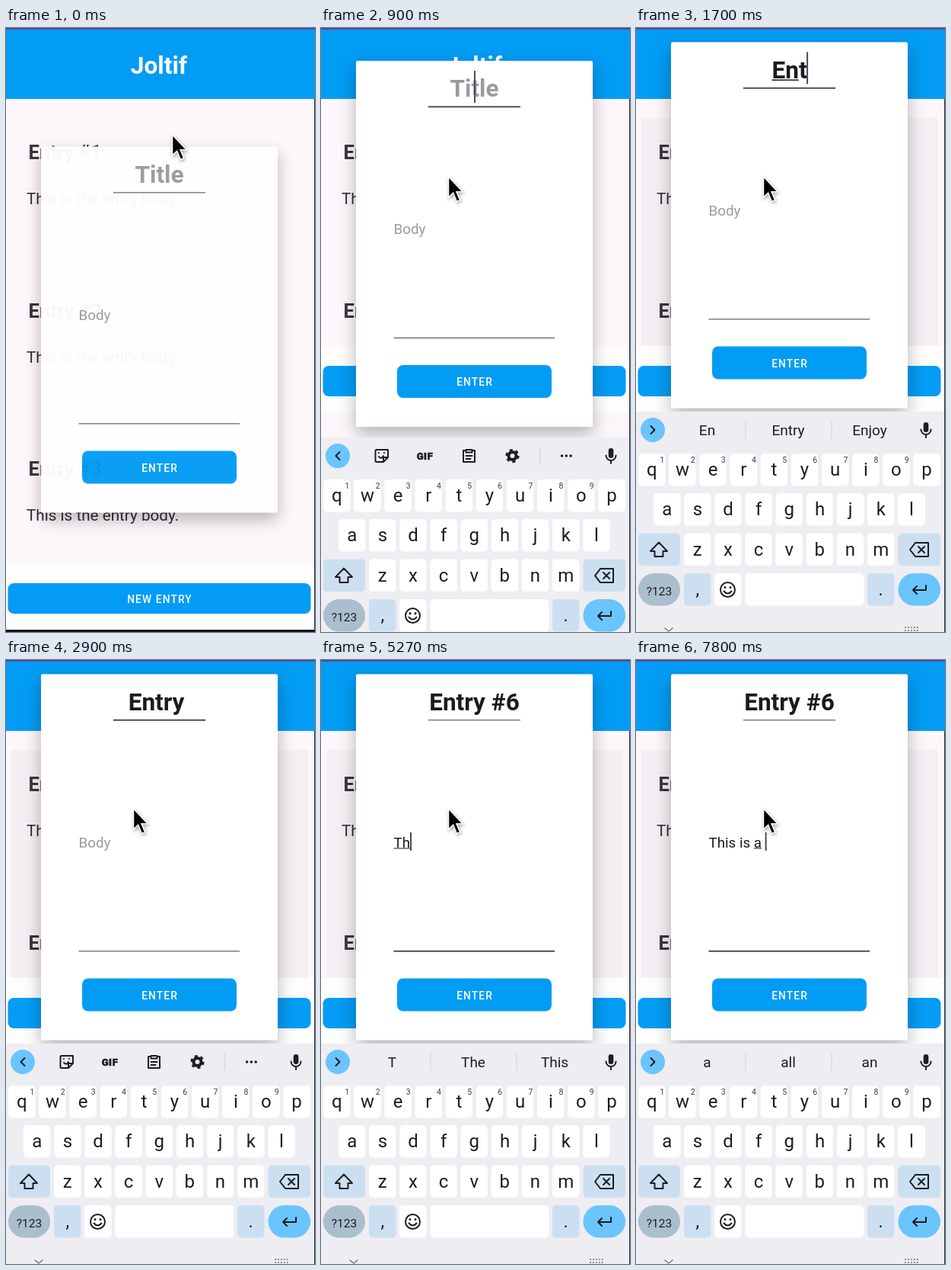
Recreate the animation shown at these times as an HTML page. Size 406x792 px, loop 8 s.

```html
<!DOCTYPE html>
<html lang="en">
<head>
<meta charset="utf-8">
<title>Journal entry form</title>
<style>
  html, body { margin: 0; width: 100%; height: 100%; overflow: hidden; background: #fdf6fa; }
  svg { display: block; width: 406px; height: 792px; font-family: Roboto, "Noto Sans", sans-serif; }
  text { white-space: pre; }
  .mid { text-anchor: middle; }
  .btn { font-size: 13.8px; font-weight: 500; letter-spacing: 1.1px; fill: #fff; text-anchor: middle; }
  .head { font-size: 31.6px; font-weight: 700; text-anchor: middle; }
  .line { fill: none; stroke: #1d1c21; stroke-width: 2; stroke-linecap: round; stroke-linejoin: round; }
  #dialog { filter: drop-shadow(0 9px 11px rgba(0, 0, 0, .28)); }
  #mouse { filter: drop-shadow(1px 2px 2px rgba(0, 0, 0, .35)); }
</style>
</head>
<body>
<svg viewBox="0 0 406 792">
  <rect width="406" height="792" fill="#fdf6fb"/>
  <rect id="cards" x="7" y="118" width="390" height="600" fill="#f5eff4"/>
  <g id="list"></g>
  <rect width="406" height="93" fill="#039cf4"/>
  <rect width="406" height="2" fill="#56489c"/>
  <text class="head" x="201" y="60" fill="#fff">Joltif</text>
  <g id="footer">
    <rect y="702" width="406" height="87" fill="#fdfdfe"/>
    <rect id="below" y="789" width="406" height="290" fill="#fbf6fa"/>
    <rect x="2.5" y="728" width="398" height="40" rx="8" fill="#049cf4"/>
    <text class="btn" x="202" y="753.5">NEW ENTRY</text>
  </g>
  <rect y="789" width="406" height="3" fill="#121214"/>
  <rect x="405" y="93" width="1" height="699" fill="#2a292c"/>

  <g id="dialog">
    <rect x="46" width="311" height="480" rx="2" fill="#fff"/>
    <text id="title" class="head" x="201.5" y="47"></text>
    <rect id="titleMark" y="49" height="1.5" fill="#1d1c21"/>
    <rect id="titleLine" x="141" width="121" fill="#504c5e"/>
    <text id="body" x="95.5" y="227" font-size="18.75"></text>
    <rect id="bodyMark" y="228" height="1" fill="#1d1c21"/>
    <rect id="bodyLine" x="95.5" width="211.5" fill="#504c5e"/>
    <rect id="caret" width="2" fill="#4c485c"/>
    <rect x="100" y="399" width="203" height="43" rx="8" fill="#039cf4"/>
    <text class="btn" x="202" y="426">ENTER</text>
  </g>

  <g id="keyboard">
    <rect y="503" width="405" height="300" fill="#eeedf2"/>
    <g id="keys"></g>
    <g class="line">
      <path d="M30 674.5l11 11.5h-5.5v7h-11v-7h-5.500z"/>
      <path d="M367 675h17v18h-17l-7-9zm4 5l8 8m0-8l-8 8"/>
      <path d="M381 731v6h-17m5-5l-5 5l5 5"/>
      <circle cx="120.500" cy="736.500" r="9.500"/>
      <path d="M115.500 738.500q5 6 10 0"/>
      <path d="M38 787l5 4l5-4" stroke="#77757c" stroke-width="1.5"/>
      <path d="M354 786h16m-16 4h16" stroke="#77757c" stroke-dasharray=".1 3.8"/>
      <path d="M117 733.500v.1m7-.1v.1" stroke-width="3"/>
    </g>
    <circle cx="22" cy="527" r="16" fill="#6ac5fd"/>
    <path id="chevron" class="line" d="M24.500 522l-5 5l5 5"/>
    <g id="tools" class="line" stroke-width="1.8">
      <path d="M73 519h15v10l-6 6h-9a1.500 1.500 0 0 1-1.500-1.500v-13a1.500 1.500 0 0 1 1.500-1.500zm15 10h-6v6m-6-7q3.500 4 6-1m-6-4v.1m7-.1v.1"/>
      <text class="mid" x="136.500" y="531.500" font-size="13" font-weight="900" letter-spacing=".6" fill="#1d1c21" stroke="#1d1c21" stroke-width=".5">GIF</text>
      <path d="M190 520h-3v15h15v-15h-3m-8.500-1h8v3.500h-8zm0 8h8m-8 4h6"/>
      <circle cx="251.500" cy="527" r="5" stroke-width="4"/>
      <circle cx="251.500" cy="527" r="7.800" stroke-width="2.600" stroke-linecap="butt" stroke-dasharray="4.084"/>
      <path d="M287.500 516v22" stroke="#d2d1d7" stroke-width="1"/>
      <path d="M316.500 527h12" stroke-width="3.500" stroke-dasharray=".1 5.700"/>
    </g>
    <g id="hints" class="mid" font-size="19" fill="#1d1c21">
      <path d="M144 515v24m113-24v24" stroke="#d2d1d7"/>
      <text x="93.500" y="534"></text>
      <text x="200" y="534"></text>
      <text x="307" y="534"></text>
    </g>
    <rect x="377.700" y="517" width="6.600" height="13" rx="3.300" fill="#1d1c21"/>
    <path class="line" d="M374.500 526.500a6.500 6.500 0 0 0 13 0m-6.500 6.500v4"/>
  </g>

  <path id="mouse" d="M0 0V27L6.200 21.200L10.800 32.500L15.200 30.600L10.500 19.700H18.800Z" fill="#000" stroke="#fff" stroke-width="1.500"/>
</svg>
<script>
const LOOP = 8000;
const $ = id => document.getElementById(id);

function add(parent, tag, attrs, label) {
  const el = document.createElementNS('http://www.w3.org/2000/svg', tag);
  set(el, attrs);
  if (label) el.textContent = label;
  parent.append(el);
  return el;
}
function set(el, attrs) {
  for (const name in attrs) el.setAttribute(name, attrs[name]);
}

for (let i = 0; i < 3; i++) {
  const y = 172 + i * 207.5;
  add($('list'), 'text', { x: 29.5, y, 'font-size': 25.6, 'font-weight': 700, fill: '#38353c' }, `Entry #${i + 1}`);
  add($('list'), 'text', { x: 27, y: y + 59, 'font-size': 20.7, fill: '#2f2d33' }, 'This is the entry body.');
}

// Keyboard
const PITCH = 40.15;
function key(x, y, w, label = '', fill = '#fff', rx = 5, size = 24) {
  add($('keys'), 'rect', { x, y, width: w, height: 42.5, rx, fill });
  add($('keys'), 'text', { x: x + w / 2, y: y + 29, 'font-size': size, class: 'mid', fill: '#1d1c21' }, label);
}
[['qwertyuiop', 3, 558], ['asdfghjkl', 23, 610], ['zxcvbnm', 63, 662.5]].forEach(([row, left, y], r) => {
  [...row].forEach((letter, i) => {
    const x = left + i * PITCH;
    key(x, y, 35.5, letter);
    if (!r) add($('keys'), 'text', { x: x + 31.5, y: y + 12, 'font-size': 10.5, class: 'mid', fill: '#3b393f' }, (i + 1) % 10);
  });
});
const SOFT = '#cbdff1';
key(3, 662.5, 55, '', SOFT);
key(344.5, 662.5, 55.5, '', SOFT);
key(3, 715, 55, '?123', '#aabecd', 21, 15.5);
key(63, 715, 35.5, ',', SOFT);
key(103, 715, 35.5);
key(143.5, 715, 156);
key(304, 715, 35.5, '.', SOFT);
key(344.5, 715, 55.5, '', '#6ac5fd', 21);

// Typing: time, text, underlined from, underlined to
const TITLE = [
  [0, '', 0, 0], [1270, 'E', 0, 1], [1530, 'En', 0, 2], [1700, 'Ent', 0, 2], [1870, 'Entr', 0, 4],
  [2030, 'Entry', 0, 5], [2200, 'Entry ', 0, 0], [3170, 'Entry #', 0, 0], [3730, 'Entry #6', 0, 0]
];
const BODY = [
  [0, '', 0, 0], [4970, 'T', 0, 1], [5270, 'Th', 0, 2], [5870, 'Ths', 0, 3], [6070, 'Thsi', 0, 4],
  [6300, 'This ', 0, 0], [7000, 'This i', 5, 6], [7170, 'This is', 5, 7], [7400, 'This is ', 0, 0],
  [7570, 'This is a', 8, 9], [7800, 'This is a ', 8, 9]
];
const HINTS = [
  [0, 'E I The'], [1570, 'En Entry Enjoy'], [1900, 'Entr Entry Enter'], [2060, 'Entry Entry’s Entryway'],
  [4970, 'T The This'], [5300, 'Th The That'], [5900, 'Ths This The'], [6130, 'Thsi This Thai'],
  [7000, 'i is in'], [7200, 'is is is a'.slice(0, 5) + ' isn’t'], [7430, 'the a not'], [7800, 'a all an']
];
const STRIP = [[0, 0], [1270, 1], [2200, 0], [4970, 1], [6300, 0], [7000, 1]];
const FOCUS_TITLE = 670, FOCUS_BODY = 4570;

const clamp = v => Math.max(0, Math.min(1, v));
const smooth = v => { v = clamp(v); return v * v * (3 - 2 * v); };
const at = (table, t) => table.findLast(step => step[0] <= t);

function track(points, t) {
  let i = points.findIndex(p => p[0] > t);
  if (i < 0) return points.at(-1)[1];
  if (!i) return points[0][1];
  const [a, from] = points[i - 1], [b, to] = points[i];
  return from + (to - from) * (t - a) / (b - a);
}

// Writes one field and returns the x of the caret.
function field(name, steps, hint, t, centred) {
  const [, value, from, to] = at(steps, t);
  const el = $(name);
  el.textContent = value || hint;
  el.setAttribute('fill', value ? '#1b1a1e' : '#9c9a9e');
  const width = n => n ? el.getSubStringLength(0, n) : 0;
  const full = value ? width(value.length) : 0;
  const left = centred ? 201.5 - full / 2 : 95.5;
  set($(name + 'Mark'), { x: left + width(from), width: to ? width(to) - width(from) : 0 });
  return left + full;
}

function underline(el, y, focused) {
  set(el, { y: focused ? y - .9 : y - .4, height: focused ? 2 : 1.1 });
}

function draw(t) {
  const raised = t >= 740;
  set($('footer'), { transform: `translate(0 ${raised ? -285 : 0})` });
  $('below').style.display = raised ? '' : 'none';
  $('cards').style.opacity = t >= 950 ? 1 : 0;

  const lift = track([[720, 0], [800, .182], [850, .53], [900, .818], [940, .94], [1000, 1]], t);
  set($('dialog'), { transform: `translate(0 ${155.5 - 137 * lift})`, opacity: .965 + .035 * clamp(t / 70) });

  const slide = track([[720, 0], [800, .2], [850, .58], [900, .88], [940, .965], [1000, 1]], t);
  set($('keyboard'), {
    transform: `translate(0 ${289 * (1 - slide)})`,
    opacity: track([[720, 0], [800, .22], [880, 1]], t)
  });

  const titleEnd = field('title', TITLE, 'Title', t, true);
  const bodyEnd = field('body', BODY, 'Body', t, false);
  const onBody = t >= FOCUS_BODY, onTitle = t >= FOCUS_TITLE && !onBody;
  underline($('titleLine'), 60.2, onTitle);
  underline($('bodyLine'), 363.2, onBody);
  const blink = t >= 2900 && t < 3170;
  set($('caret'), {
    x: onBody ? bodyEnd : titleEnd - .5,
    y: onBody ? 207.5 : 13,
    height: onBody ? 24 : 42,
    opacity: (onTitle || onBody) && !blink ? 1 : 0
  });

  const [since, mode] = at(STRIP, t);
  const turn = smooth((t - since) / 230);
  const shown = !since ? 0 : mode ? turn : 1 - turn;
  set($('chevron'), { transform: `rotate(${180 * shown} 22 527)` });
  set($('tools'), { opacity: clamp(1 - 2 * shown) });
  set($('hints'), { opacity: clamp(2 * shown - 1) });
  const words = at(HINTS, t)[1].split(' ');
  $('hints').querySelectorAll('text').forEach((el, i) => { el.textContent = words[i]; });

  const move = smooth((t - 30) / 570);
  set($('mouse'), { transform: `translate(${218.5 - 51 * move} ${140 + 55 * move})` });
}

const start = performance.now();
function frame() {
  draw((performance.now() - start) % LOOP);
  requestAnimationFrame(frame);
}
draw(0);
requestAnimationFrame(frame);
</script>
</body>
</html>
```
